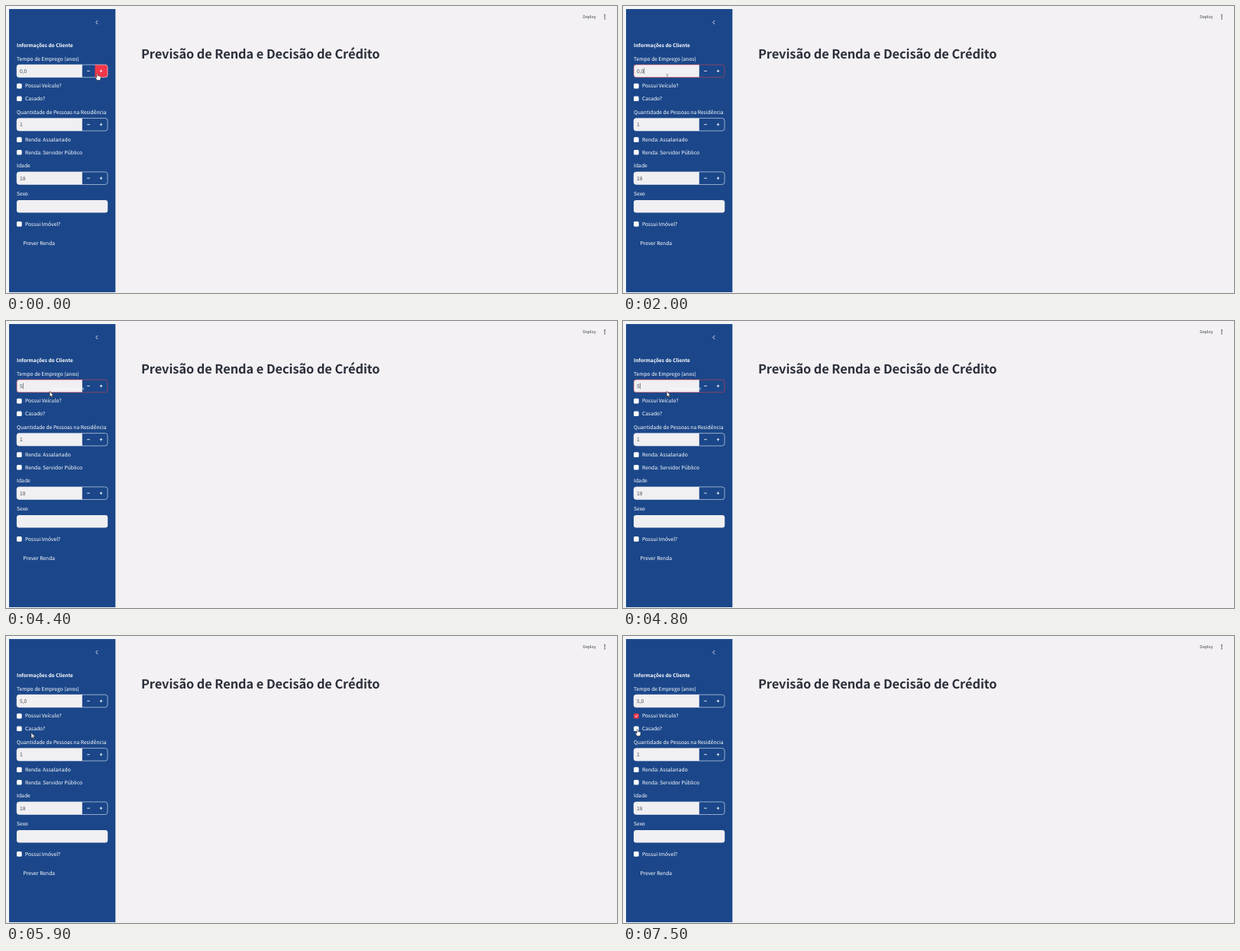
Animation of 800 by 377 pixels, one loop 8000 ms. Source, as an HTML page:

```html
<!DOCTYPE html>
<html lang="pt">
<head>
<meta charset="utf-8">
<title>Previsão de Renda</title>
<style>
  html, body { margin: 0; width: 100%; height: 100%; overflow: hidden; background: #f3f1f4; }
  svg { display: block; width: 100vw; height: 100vh; }
  text {
    font: 6.71px "Noto Sans CJK JP", "Noto Sans CJK SC", "Noto Sans", sans-serif;
    fill: #fff; text-rendering: geometricPrecision; white-space: pre;
  }
  text.heading { font-size: 6.5px; font-weight: 700; }
  text.title { font-size: 16.4px; font-weight: 700; letter-spacing: -.005em; fill: #2b2f3a; }
  text.deploy { font-size: 5.22px; fill: #33363f; }
  text.value { fill: #4b4c55; }
  text.hint { font-size: 4.5px; text-anchor: end; }
  .line { fill: none; stroke: #fff; stroke-width: .85; }
</style>
</head>
<body>
<svg viewBox="0 0 800 377" preserveAspectRatio="none">
  <rect width="800" height="377" fill="#f3f1f4"/>
  <rect width="144" height="377" fill="#f3f6f9"/>
  <rect x="4" y="4" width="139.3" height="372" fill="#1b478a"/>
  <text class="title" x="177" y="69">Previsão de Renda e Decisão de Crédito</text>
  <text class="deploy" x="755.3" y="16.4">Deploy</text>
  <g fill="#2b2f3a">
    <circle cx="784" cy="11.9" r=".8"/><circle cx="784" cy="14.3" r=".8"/><circle cx="784" cy="16.7" r=".8"/>
  </g>
  <path id="chevron" class="line" d="M120.2 19l-2.5 2.5 2.5 2.5"/>
  <g id="form"></g>
  <g id="hand" fill="#fff" stroke="#222" stroke-width=".5" stroke-linejoin="round">
    <path d="M-.6 .5Q0-.3 .6 .5V3.3Q1.4 2.7 2 3.5 2.7 3 3.3 3.8 4.2 3.4 4.5 4.4V6.4L3.7 9H-.4L-2.3 5.7Q-2.5 4.6-1.5 5L-.6 5.8Z"/>
  </g>
  <path id="arrow" d="M0 0V7.2L1.7 5.7 2.8 8.2 3.9 7.7 2.8 5.3H5Z" fill="#fff" stroke="#222" stroke-width=".6" stroke-linejoin="round"/>
  <path id="beam" d="M-.9-2.8Q0-2.8 0-2.2V2.4Q0 3-.9 3M.9-2.8Q0-2.8 0-2.2M0 2.4Q0 3 .9 3" fill="none" stroke="#555" stroke-width=".6"/>
</svg>
<script>
const LOOP = 8000, STEP = 100, RED = '#f23648';
const $ = id => document.getElementById(id);
const form = $('form');

function add(tag, attrs, content) {
  const el = document.createElementNS('http://www.w3.org/2000/svg', tag);
  for (const key in attrs) el.setAttribute(key, attrs[key]);
  if (content) el.textContent = content;
  return form.appendChild(el);
}
const label = (x, cy, content, cls = '') => add('text', { x, y: cy + 2.4, class: cls }, content);
const show = (el, on) => el.setAttribute('visibility', on ? 'visible' : 'hidden');

function checkbox(cy, content) {
  label(25, cy, content);
  return add('rect', { x: 14, y: cy - 3.3, width: 6.7, height: 6.7, rx: 1.5, fill: '#fafafb' });
}

function numberField(cy, value) {
  const top = cy - 8.3, bottom = cy + 8.3;
  const minus = add('rect', { x: 99.8, y: top, width: 16.7, height: 16.6, fill: RED });
  const plus = add('path', { d: `M116.5 ${top}H130Q133.2 ${top} 133.2 ${top + 3.3}V${bottom - 3.3}Q133.2 ${bottom} 130 ${bottom}H116.5Z`, fill: RED });
  add('path', { d: `M99.8 ${top}H17.3Q14 ${top} 14 ${top + 3.3}V${bottom - 3.3}Q14 ${bottom} 17.3 ${bottom}H99.8Z`, fill: '#f0eff2' });
  const border = add('rect', { x: 14.2, y: top, width: 118.8, height: 16.6, rx: 3.3, fill: 'none', stroke: '#e9edf5', 'stroke-width': .6 });
  add('path', { class: 'line', d: `M106.2 ${cy}h3.6M122.7 ${cy}h3.6M124.5 ${cy - 1.8}v3.6` });
  show(minus, false);
  show(plus, false);
  return { minus, plus, border, text: label(18, cy + .2, value, 'value') };
}

label(14, 52, 'Informações do Cliente', 'heading');
label(14, 69.3, 'Tempo de Emprego (anos)');
const job = numberField(85.4, '0,0');
const hint = add('text', { x: 102.4, y: 90, class: 'hint' }, 'Press Enter to apply');
const caret = add('rect', { y: 81.6, width: .6, height: 7.6, fill: '#333' });
const vehicle = checkbox(105, 'Possui Veículo?');
const tick = add('path', { class: 'line', d: 'M15.7 105.1l1.3 1.4 2.2-2.8' });
checkbox(121.7, 'Casado?');
label(14, 139.4, 'Quantidade de Pessoas na Residência');
numberField(155.7, '1');
checkbox(175.5, 'Renda: Assalariado');
checkbox(192.2, 'Renda: Servidor Público');
label(14, 210, 'Idade');
numberField(226.2, '18');
label(14, 246.6, 'Sexo');
add('rect', { x: 14, y: 254.9, width: 119.2, height: 16.6, rx: 3.3, fill: '#f0eff2' });
checkbox(286.4, 'Possui Imóvel?');
label(22.4, 311.4, 'Prever Renda');

// time, x, y of the pointer tip
const path = [
  [0, 119.5, 88.5], [900, 60, 90], [1000, 60, 90], [1500, 58, 92.4], [2500, 58, 92.4],
  [2600, 57.2, 92.4], [4800, 57.2, 92.4], [5200, 152, 104], [5400, 170, 106], [5800, 170, 106],
  [5900, 33, 127], [6500, 17, 104], [6900, 17, 104], [7500, 18.6, 122.3], [LOOP, 18.6, 122.3]
];
// time, field text, focused, caret shown
const edits = [
  [0, '0,0', 0, 0], [1800, '0,0', 1, 1], [2300, '0,0', 1, 0], [2600, '0,', 1, 0],
  [2900, '', 1, 0], [4000, '5', 1, 1], [4900, '5', 1, 0], [5300, '5,0', 0, 0]
];

function pointerAt(t) {
  const i = path.findIndex(p => p[0] > t);
  const [t0, x0, y0] = path[i - 1], [t1, x1, y1] = path[i];
  const k = (t - t0) / (t1 - t0);
  return [x0 + (x1 - x0) * k, y0 + (y1 - y0) * k];
}

function render(t) {
  const [x, y] = pointerAt(t);
  const inside = x < 143.3;
  form.setAttribute('transform', `translate(0 ${inside ? 0 : -5})`);
  show($('chevron'), inside);

  const [, value, focused, caretOn] = edits.filter(e => e[0] <= t).pop();
  job.text.textContent = value;
  job.border.setAttribute('stroke', focused ? '#d0404f' : '#e9edf5');
  caret.setAttribute('x', 18.2 + (value ? job.text.getComputedTextLength() : 0));
  show(caret, caretOn);
  show(hint, t >= 2600 && focused);

  const inField = y > 77 && y < 94;
  const overPlus = inField && x > 116.5 && x < 133 && t < 1000;
  const overMinus = inField && x > 99.8 && x <= 116.5 && t < 1000;
  show(job.plus, overPlus);
  show(job.minus, overMinus);

  const checked = t >= 6600;
  vehicle.setAttribute('fill', checked ? RED : '#fafafb');
  show(tick, checked);

  const overCheck = x < 52 && (Math.abs(y - 105) < 5 || Math.abs(y - 121.7) < 5);
  const kind = overPlus || overMinus || overCheck ? 'hand' : inField && t < 2600 ? 'beam' : 'arrow';
  for (const id of ['hand', 'beam', 'arrow']) show($(id), id === kind);
  $(kind).setAttribute('transform', `translate(${x} ${y})`);
}

const start = performance.now();
function frame() {
  const t = (performance.now() - start) % LOOP;
  render(Math.floor(t / STEP) * STEP);
  requestAnimationFrame(frame);
}
frame();
</script>
</body>
</html>
```
